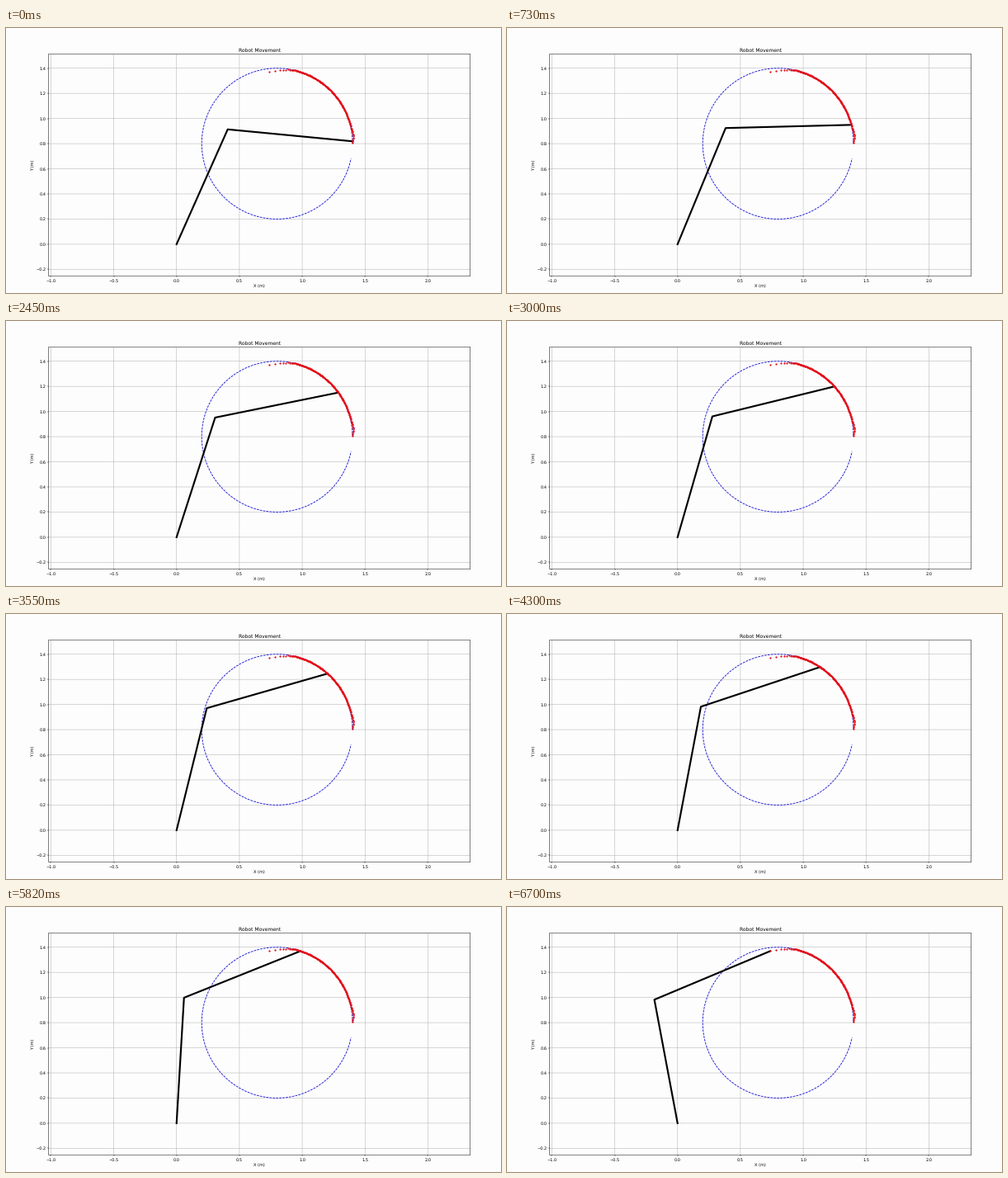
A matplotlib script that plays this animation: 600x321 px, repeating every 6.73 s.

```python
import numpy as np
import matplotlib.pyplot as plt
from matplotlib.animation import FuncAnimation

W, H = 600, 321
DPI = 100 * W / 1680
LOOP, FRAMES, STEPS = 6730, 224, 149
CENTER, RADIUS = 0.8, 0.6
PAPER, BLUE, RED = "#fefdfe", "#1414d2", "#e30d16"

plt.rcParams.update({"font.family": "DejaVu Sans", "text.hinting": "none",
                     "path.snap": False, "axes.linewidth": 1,
                     "figure.facecolor": PAPER, "axes.facecolor": PAPER})


def polar(angle, radius):
    return CENTER + radius * np.cos(angle), CENTER + radius * np.sin(angle)


def tip(step):
    """Tip of the arm: a quick start, a steady sweep and a final surge."""
    u = np.asarray(step) / STEPS
    start = 9 * (1 - np.exp(-u / 0.13))
    surge = 15 * np.exp((u - 1) / 0.0195)
    deg = 1.75 + 70.5 * u + start + surge
    bulge = 0.008 * np.exp(-((deg - 7) / 5) ** 2)
    drop = 0.0015 * np.maximum(deg - 78, 0)
    return polar(np.radians(deg), RADIUS + bulge - drop)


def elbow(x, y):
    """Elbow of a two-link arm with unit links."""
    d = np.hypot(x, y)
    h = np.sqrt(1 - d * d / 4)
    return x / 2 - h * y / d, y / 2 + h * x / d


fig = plt.figure(figsize=(W / DPI, H / DPI), dpi=DPI)
ax = fig.add_axes([51.7 / W, 1 - 300.2 / H, 511 / W, 268.4 / H])
ax.set(xlim=(-1.018, 2.337), ylim=(-0.2515, 1.511), title="Robot Movement")
ax.set_xlabel("X (m)", labelpad=5)
ax.set_ylabel("Y (m)", labelpad=2)
ax.grid(True, linewidth=1)

ax.plot(*polar(np.linspace(0, 2 * np.pi - 0.2, 200), RADIUS),
        color=BLUE, linewidth=1.8, linestyle=(0, (3.08, 1.33)))
arm, = ax.plot([], [], "k-", linewidth=4.3)
ax.plot(*tip(np.arange(-1, STEPS + 1)), "o", color=RED, markersize=3.2)


def draw(i):
    x, y = tip(round(i * STEPS / (FRAMES - 1)))
    ex, ey = elbow(x, y)
    arm.set_data([0, ex, x], [0, ey, y])
    return arm,


anim = FuncAnimation(fig, draw, frames=FRAMES, interval=LOOP / FRAMES,
                     repeat=True, repeat_delay=0)
plt.show()
```
